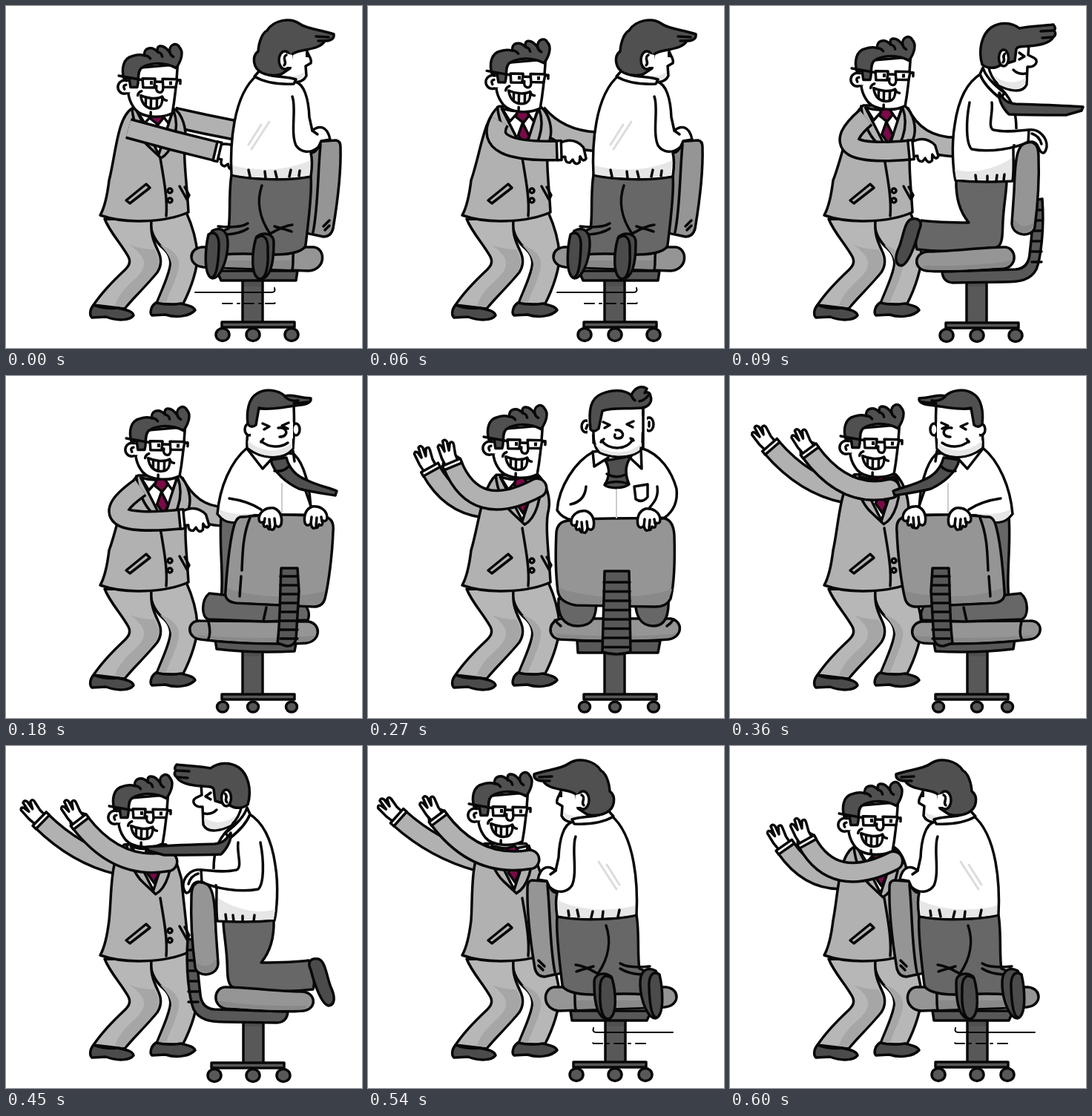
These frames come from a looping animation (480x461 px, 630 ms). An HTML page with a canvas:

```html
<!DOCTYPE html>
<html lang="en">
<head>
<meta charset="utf-8">
<title>Chair spin</title>
<style>
html, body { margin: 0; width: 100%; height: 100%; overflow: hidden; background: #fff; }
canvas { display: block; }
</style>
</head>
<body>
<canvas id="stage" width="480" height="461"></canvas>
<script>
const ctx = document.getElementById('stage').getContext('2d');
const INK = '#080808', SUIT = '#b1b1b1', LEGS = '#b7b7b7', LEGS_SHADE = '#a6a6a6', CHAIR = '#959595', CHAIR_SHADE = '#898989';
const DARK = '#585858', TROUSERS = '#676767', HAIR = '#505050', SHOE = '#4b4b4b', PALE = '#e6e6e6', WHITE = '#fff', WINE = '#7a0a48';
const LOOP = 630, STEP = 30, POSE = 90, AXIS = 333;

function flat(color, ...paths) {
  ctx.fillStyle = color;
  for (const d of paths) ctx.fill(new Path2D(d));
}
function line(...paths) {
  ctx.strokeStyle = INK;
  ctx.lineWidth = 3.5;
  for (const d of paths) ctx.stroke(new Path2D(d));
}
function shape(color, ...paths) {
  for (const d of paths) { flat(color, d); line(d); }
}
function thin(color, width, d) {
  ctx.strokeStyle = color;
  ctx.lineWidth = width;
  ctx.stroke(new Path2D(d));
}
function oval(color, x, y, rx, ry = rx) {
  shape(color, `M${x - rx},${y} a${rx},${ry} 0 1 0 ${2 * rx},0 a${rx},${ry} 0 1 0 ${-2 * rx},0Z`);
}
function moved(x, y, draw, angle = 0) {
  ctx.save();
  ctx.translate(x, y);
  ctx.rotate(angle);
  draw();
  ctx.restore();
}

// time, head shift, then shoulder, bend and wrist of the left and right arm
const keys = [
  [0, 0, 0, 165, 165, 225, 182, 284, 196, 226, 150, 270, 160, 312, 168],
  [90, 12, -10, 183, 150, 118, 206, 243, 194, 228, 142, 250, 190, 305, 190],
  [180, 10, -10, 181, 150, 102, 206, 236, 193, 226, 142, 250, 190, 295, 189],
  [270, 4, -12, 155, 178, 110, 172, 85, 127, 228, 151, 145, 195, 114, 120],
  [360, -3, -13, 155, 158, 100, 147, 56, 96, 216, 152, 155, 166, 108, 102],
  [450, -13, -13, 150, 160, 95, 147, 48, 101, 218, 156, 150, 168, 100, 103],
  [540, -16, -16, 150, 156, 90, 140, 42, 97, 218, 153, 145, 165, 95, 98],
  [600, -5, -3, 148, 180, 105, 180, 75, 137, 220, 155, 140, 195, 104, 130]
];
function bodyAt(t) {
  const i = keys.findLastIndex(k => k[0] <= t), from = keys[i], to = keys[i + 1] || from;
  const f = to === from ? 0 : (t - from[0]) / (to[0] - from[0]);
  return from.map((v, n) => v + (to[n] - v) * f).slice(1);
}

function arm([sx, sy, bx, by, wx, wy], back, cap) {
  const d = `M${sx},${sy} Q${bx},${by} ${wx},${wy}`;
  ctx.lineCap = cap;
  thin(INK, 29, d);
  thin(SUIT, 22, d);
  ctx.lineCap = 'round';
  moved(wx, wy, () => {
    shape(WHITE, back
      ? 'M2,-9 L14,-10 L30,-9 Q34,-6 29,-4 L21,-3 L35,0 Q37,4 32,5 L20,3 L29,8 Q30,13 25,12 L12,9 L2,9Z'
      : 'M2,-10 C16,-16 26,-13 34,-3 L37,12 Q33,18 29,9 L28,17 Q22,22 19,13 L15,17 Q8,17 9,9 L2,9Z');
    shape(WHITE, 'M-2,-13 H4 V13 H-2Z');
  }, Math.atan2(wy - by, wx - bx));
}

function legs() {
  shape(LEGS,
    'M195,288 C194,303 200,315 210,325 C221,334 223,343 221,352 C217,370 208,387 203,401 L238,403 C250,380 259,352 258,335 C257,315 252,298 243,278Z',
    'M133,287 C140,305 155,320 165,338 C169,346 165,351 160,356 C145,370 130,385 118,403 L160,408 C172,393 192,374 204,359 C211,348 209,338 205,330 C197,313 195,305 196,288Z');
  flat(LEGS_SHADE, 'M167,322 C189,338 192,350 176,366 C160,380 150,392 147,404 L158,406 C172,391 190,374 202,358 C208,348 206,338 200,328 C188,328 178,326 167,322Z',
    'M208,322 C222,326 236,337 233,352 C229,372 220,385 216,400 L205,400 C212,382 222,363 223,348 C222,338 216,331 208,322Z');
  shape(SHOE, 'M118,403 C112,410 113,418 116,420 L135,419 C150,425 167,424 172,417 C170,410 158,409 150,407 Q135,409 118,403Z',
    'M202,400 C194,406 194,415 197,417 L215,416 C230,421 248,418 255,410 C253,404 242,403 236,401 Q220,404 202,400Z');
}

function smilingHead() {
  shape(WHITE, 'M178,80 L233,74 C232,98 230,122 227,140 C212,148 187,147 177,136 C168,125 165,112 168,98Z');
  oval(WHITE, 162, 106, 9);
  flat(WHITE, 'M165,99 H174 V113 H165Z');
  line('M164,103 q-5,1 -2,6');
  shape(HAIR, 'M161,95 C157,82 159,67 172,64 Q180,61 188,63 C186,53 197,49 206,58 C202,48 213,46 222,58 C220,48 231,43 235,51 C241,57 238,69 231,79 C215,71 196,72 184,80 C178,86 182,96 179,106 L170,106 L168,94Z');
  line('M188,63 q5,0 8,4', 'M206,58 q5,1 6,6', 'M222,58 q1,4 5,6');
  line('M154,91 L186,96', 'M203,98 H213', 'M231,96 L237,95 V100');
  shape(WHITE, 'M186,94 H203 L202,106 H187Z', 'M213,94 H233 L231,105 H214Z');
  flat(INK, 'M196,97 h4 v5 h-4Z', 'M222,97 h4 v5 h-4Z');
  line('M205,104 C203,114 214,115 214,107');
  shape(WHITE, 'M184,117 C193,121 206,122 213,118 C214,127 211,133 205,134 C194,136 186,130 184,117Z');
  line('M191,121 V131', 'M198,122 V134', 'M206,121 V132', 'M180,117 q1,-5 5,-6', 'M213,118 q2,5 6,5', 'M198,139 V143');
}

function pusher(t) {
  const [hx, hy, ...joints] = bodyAt(t), left = joints.slice(0, 6), right = joints.slice(6);
  const thrown = t > 210, a = hx * .8, b = hy * .4;
  legs();
  thrown ? arm(left, true, 'butt') : arm(right, false, 'butt');
  shape(SUIT, `M${170 + a},${138 + b} C${150 + a},150 ${148 + a / 2},200 139,235 C136,260 131,275 127,282 C160,294 215,292 246,278 C244,240 238,200 ${242 + a / 2},180 C${243 + a},165 ${238 + a},145 ${226 + a},${138 + b}Z`);
  moved(a * .7, b, () => {
    shape(WHITE, 'M176,141 L206,200 L225,141 Q200,148 176,141Z');
    shape(WINE, 'M204,160 L213,178 L207,190 L198,177Z', 'M197,144 L207,141 L213,150 L205,160 L195,152Z');
    line('M170,139 C172,158 180,178 192,189 L209,205 C222,198 236,168 226,141', 'M177,142 L187,158 L196,148', 'M212,149 L219,158 L225,142');
  });
  line('M208,205 C213,235 218,260 216,283', 'M234,243 l10,18 3,-6 -6,-11');
  shape(SUIT, 'M162,262 L189,240 L194,245 L167,266Z');
  oval(SUIT, 221, 249, 3);
  oval(SUIT, 221, 262, 3);
  moved(hx, hy, smilingHead, .02);
  thrown ? arm(right, true, 'round') : arm(left, false, 'butt');
}

function base(wheelY, r) {
  shape(DARK, 'M319,365 H346 V430 H319Z');
  flat(HAIR, 'M321,366 H344 V378 H321Z');
  shape(DARK, `M291,${wheelY - 17} H389 V${wheelY - 10} H291Z`);
  for (const x of [292, 333, 385]) oval(DARK, x, wheelY, r, r - .5);
}
function ribs(x, width, top, bottom, gap) {
  for (let y = top; y <= bottom; y += gap) line(`M${x},${y} h${width}`);
}
function gripHand(x, y, flip = 1) {
  moved(x, y, () => {
    ctx.scale(flip, 1);
    shape(WHITE, 'M-14,6 C-13,-4 -4,-9 6,-8 C15,-5 18,5 16,14 Q13,20 8,15 Q6,24 1,20 Q-1,22 -3,16 Q-8,20 -8,11 Q-14,13 -14,6Z');
    line('M8,15 L7,6', 'M1,18 L0,7', 'M-7,12 L-6,6');
  });
}

function backPose() {
  base(443, 9);
  shape(DARK, 'M284,357 H393 L391,370 H290Z');
  shape(CHAIR, 'M416,183 L445,181 Q451,182 451,190 C452,225 446,270 441,300 Q438,311 428,311 L405,306 L411,215Z');
  flat(CHAIR_SHADE, 'M412,200 L423,186 C421,230 420,270 414,306 L407,305Z');
  line('M424,187 C420,230 421,270 414,305', 'M428,297 L436,289', 'M430,302 L436,296');
  shape(CHAIR, 'M264,325 C245,327 245,350 266,352 L408,357 C432,355 431,327 415,325Z');
  flat(CHAIR_SHADE, 'M268,343 H385 V355 L270,351Z');
  line('M388,328 C386,338 388,348 386,355');
  shape(TROUSERS, 'M304,228 C300,250 303,285 300,300 L288,305 L292,335 C330,332 350,336 365,335 C385,335 403,330 404,322 C408,290 413,250 411,230Z');
  line('M345,242 C338,262 341,285 356,307 C365,302 375,296 386,295', 'M362,297 C372,300 380,302 385,304', 'M286,297 C305,299 318,298 326,293', 'M298,308 C310,307 320,304 326,300');
  shape(SHOE, 'M278,303 C292,296 300,305 299,323 C298,345 288,368 278,367 C268,362 268,322 278,303Z', 'M273,308 C282,302 288,310 287,326 C286,352 283,367 276,366 C266,358 269,325 273,308Z',
    'M338,311 C347,304 362,306 361,320 C361,345 357,366 344,368 C330,366 332,330 338,311Z', 'M337,313 C347,306 354,312 353,330 C354,350 351,368 342,368 C329,364 332,330 337,313Z');
  shape(WHITE, 'M339,93 L390,102 C402,105 408,125 409,150 L413,168 C421,161 433,160 437,180 L425,182 C420,195 415,198 411,198 C414,210 412,222 411,230 C380,236 330,234 304,228 C302,190 305,120 339,93Z');
  flat(PALE, 'M306,215 C340,224 380,222 410,208 L409,228 C380,234 330,232 306,227Z');
  thin('#dcdcdc', 3, 'M355,156 L331,193 M344,160 L327,187');
  line('M386,122 C392,137 383,170 391,188 C398,198 410,199 420,191', 'M413,168 L420,173', 'M327,221 l2,9', 'M349,223 l1,9', 'M363,223 l2,8', 'M384,221 l-2,9', 'M396,222 l-1,7');
  shape(WHITE, 'M382,62 L405,57 C406,67 413,69 411,77 L404,81 L405,94 C400,105 386,104 378,99 L360,92 L366,70Z');
  flat(PALE, 'M372,94 C385,96 398,94 403,88 C403,101 388,103 378,98Z');
  shape(WHITE, 'M342,87 C355,97 375,94 391,99 L388,105 C368,106 350,104 335,95Z');
  shape(HAIR, 'M345,90 C333,84 331,68 340,61 C341,47 346,36 352,33 C360,20 382,14 396,24 C405,31 425,32 442,38 C443,44 438,47 430,47 C425,55 415,57 405,59 C395,61 388,62 385,66 L383,84 L371,92 Q358,96 345,90Z');
  oval(WHITE, 376, 73, 8, 12);
  flat(WHITE, 'M378,64 L386,66 V82 H378Z');
  line('M378,66 C371,70 380,76 375,80', 'M418,41 L435,42', 'M421,47 L430,47');
  flat(INK, 'M404,62 h4 v7 h-4Z');
  thin(INK, 2, 'M255,386 H358 Q364,386 362,380');
  ctx.setLineDash([13, 7, 3, 6]);
  thin(INK, 2, 'M292,401 H362 L367,396');
  ctx.setLineDash([]);
}

function sidePose() {
  base(444, 9);
  shape(DARK, 'M286,358 L385,355 C398,354 403,345 404,335 C407,310 409,290 409,262 L421,260 C424,300 419,340 413,355 C405,370 390,372 370,372 L300,373 Q287,372 286,358Z');
  ribs(407, 13, 275, 346, 14);
  shape(TROUSERS, 'M305,234 C304,262 312,280 322,292 C295,292 272,291 258,289 C251,300 249,320 252,328 C290,333 330,330 358,326 C369,323 367,305 368,290 C369,268 373,250 373,235Z');
  shape(SHOE, 'M245,287 C256,285 260,292 255,302 C250,322 240,349 231,350 C222,349 222,338 228,325 C234,310 235,290 245,287Z');
  shape(CHAIR, 'M270,331 C247,330 246,355 265,357 C300,360 350,355 370,354 C389,350 386,325 370,325 C340,325 300,331 270,331Z');
  flat(CHAIR_SHADE, 'M260,350 C300,351 350,349 379,343 Q376,352 369,352 C340,354 290,358 263,355Z');
  shape(WHITE, 'M339,91 C320,102 308,125 303,160 C298,190 301,222 304,235 C330,238 360,237 381,236 C383,220 382,205 382,193 L386,166 C386,145 382,128 366,112Z');
  flat(PALE, 'M303,220 C330,228 360,218 380,205 L379,234 H305Z');
  shape(CHAIR, 'M396,186 C385,191 384,220 383,250 L380,293 C381,312 409,312 411,298 C416,260 417,230 416,202 C416,183 406,181 396,186Z');
  flat(CHAIR_SHADE, 'M382,285 C390,300 403,299 410,290 C410,308 383,311 382,293Z');
  flat(WHITE, 'M324,150 L354,164 L403,167 L402,184 L326,193Z');
  line('M323,130 C318,155 318,186 326,193 C350,198 385,192 402,183', 'M353,130 C355,145 347,163 355,167 C372,171 388,168 403,167');
  shape(WHITE, 'M403,167 C417,165 428,178 427,190 Q424,203 418,195 L414,187 Q409,181 402,184Z');
  line('M407,172 q10,3 13,14', 'M331,228 l1,8', 'M347,229 v7', 'M360,228 l-1,8', 'M370,227 l-1,8');
  shape(WHITE, 'M372,56 L403,52 L402,66 L410,70 C417,74 412,83 401,82 L400,106 C394,119 374,114 362,106 C354,99 350,90 348,80Z');
  flat(PALE, 'M355,92 C370,107 390,104 399,96 C400,116 378,114 363,106Z');
  shape(WHITE, 'M341,83 C345,97 358,108 370,117 L365,125 C352,115 342,105 337,92Z');
  shape(HAIR, 'M340,79 C334,58 340,38 352,29 C364,21 380,22 390,30 C405,27 420,27 436,25 Q440,30 437,33 Q441,38 436,42 C431,51 415,53 403,54 C393,55 388,54 386,58 L384,74 L364,80 C357,85 346,84 340,79Z');
  line('M419,34 L437,33', 'M421,43 L435,42');
  oval(WHITE, 369, 70, 6.5, 11);
  line('M371,64 C365,69 373,72 368,76', 'M390,63 L397,68 L390,72', 'M382,86 Q389,93 399,91');
  shape(HAIR, 'M363,117 C370,128 375,131 385,132 C410,133 450,134 476,136 L474,141 L453,147 C420,147 395,147 376,146 C366,136 362,125 363,117Z');
}

function squint(x, y, gap) {
  line(`M${x},${y} l9,4 -7,4`, `M${x + gap},${y - 1} l-9,4 8,4`);
}

function quarterPose() {
  base(446, 7.5);
  shape(DARK, 'M282,355 H392 L389,371 Q335,374 284,368Z');
  shape(TROUSERS, 'M290,190 C287,230 294,270 290,300 L340,310 V190Z');
  shape(CHAIR, 'M262,330 C243,329 243,353 262,355 C310,361 370,362 405,360 C425,357 425,334 408,331Z');
  flat(CHAIR_SHADE, 'M258,349 C310,354 370,354 416,350 Q413,358 404,358 C360,360 300,358 262,353Z');
  line('M273,331 C275,340 276,348 273,354');
  shape(TROUSERS, 'M274,293 C263,302 263,325 273,328 L350,331 L407,329 C411,318 405,310 400,306Z');
  line('M351,312 L347,330');
  shape(WHITE, 'M325,97 C303,115 288,150 285,186 Q295,199 308,197 L320,188 L411,187 C411,150 402,118 388,105Z');
  flat(PALE, 'M288,180 Q310,190 343,184 L318,190 L308,196 Q293,196 288,185Z');
  shape(CHAIR, 'M320,190 C350,186 400,186 430,190 Q443,192 441,210 C440,240 435,280 430,300 Q427,311 415,311 L310,306 Q294,304 296,290 C298,260 302,220 308,200 Q312,188 320,190Z');
  flat(CHAIR_SHADE, 'M298,285 C330,300 390,300 430,290 Q427,309 415,309 L310,304 Q297,302 298,285Z');
  line('M329,191 C319,215 319,240 318,262', 'M317,270 L315,297');
  shape(DARK, 'M371,259 H393 L395,290 L391,355 Q388,365 378,364 L366,360 C370,330 369,300 371,259Z');
  ribs(370, 23, 270, 355, 12);
  line('M301,165 C315,167 332,172 344,180', 'M404,155 L412,178');
  thin('#ccc', 2, 'M372,145 V184');
  gripHand(355, 186);
  gripHand(419, 184, -1);
  shape(WHITE, 'M330,45 L388,40 C389,60 388,85 387,98 C375,114 345,113 325,97 C324,80 328,60 330,45Z');
  flat(PALE, 'M326,87 C345,104 370,104 386,90 L386,97 C372,112 345,111 327,96Z');
  oval(WHITE, 328, 72, 6, 8);
  oval(WHITE, 391, 72, 5, 8);
  flat(WHITE, 'M330,62 H340 V84 H330Z', 'M379,62 H387 V84 H379Z');
  shape(HAIR, 'M326,65 C324,48 327,30 338,24 C350,16 367,19 376,27 C386,24 392,29 411,30 C412,37 403,39 390,40 C370,43 350,46 341,43 L337,66 Q331,71 326,65Z');
  line('M376,28 q8,7 18,5', 'M388,37 L408,35');
  squint(346, 64, 35);
  line('M367,70 C380,68 382,82 369,82', 'M344,88 C355,97 370,97 380,90', 'M344,89 l3,-4');
  line('M325,98 L346,125 L358,112', 'M387,101 L389,115');
  shape(HAIR, 'M357,113 L378,110 C382,125 392,135 405,140 C420,148 435,150 446,155 L444,161 C425,158 410,156 395,152 C380,145 360,130 357,113Z');
  line('M362,128 q12,2 20,-7');
}

function frontPose() {
  base(446, 7.5);
  shape(DARK, 'M282,357 H394 L391,373 H283Z');
  shape(CHAIR, 'M262,327 C243,328 240,352 258,355 C310,358 370,358 405,355 C425,352 425,330 408,327Z');
  flat(CHAIR_SHADE, 'M252,347 C310,352 370,352 415,347 Q412,353 404,353 C360,356 300,356 258,353Z');
  shape(TROUSERS, 'M257,300 C255,325 265,337 283,337 C303,337 308,325 308,302Z', 'M360,302 C361,325 368,337 385,337 C402,337 406,320 405,300Z');
  line('M252,329 q4,5 8,8', 'M412,328 q-4,6 -9,9');
  shape(WHITE, 'M304,102 C279,115 257,150 255,181 Q262,192 275,194 L400,191 C412,182 418,170 416,152 C410,130 395,105 368,97Z');
  shape(CHAIR, 'M270,195 C310,190 370,192 400,192 Q412,195 413,215 C414,250 413,280 408,300 Q402,312 385,311 L280,309 Q258,305 256,290 C252,260 253,230 254,210 Q256,196 270,195Z');
  flat(CHAIR_SHADE, 'M257,285 C290,300 370,303 410,287 Q405,310 385,309 L280,307 Q259,303 257,285Z');
  shape(DARK, 'M319,263 H352 L354,372 Q335,378 316,372Z');
  ribs(318, 35, 278, 366, 12.5);
  line('M294,149 C293,162 287,170 273,173', 'M390,149 C392,163 386,170 380,177');
  thin('#ccc', 2, 'M335,152 V191');
  gripHand(288, 190);
  gripHand(380, 187, -1);
  shape(WHITE, 'M359,149 L377,146 V163 Q370,172 361,166Z');
  shape(WHITE, 'M304,45 C302,75 303,95 312,103 C330,112 360,111 370,97 L371,40Z');
  flat(PALE, 'M306,92 C325,108 355,105 369,90 V97 C358,110 330,110 313,102Z');
  oval(WHITE, 294, 68, 6, 8);
  oval(WHITE, 379, 65, 6, 9);
  flat(WHITE, 'M296,58 H312 V79 H296Z', 'M362,54 H376 V76 H362Z');
  line('M371,42 V97', 'M304,70 V90', 'M296,66 l-2,5', 'M379,62 v6');
  shape(HAIR, 'M300,72 C297,45 300,30 315,24 C330,18 346,18 355,26 C359,16 368,12 376,17 L373,23 Q380,20 381,27 C384,36 377,42 369,43 C350,45 330,42 316,47 L311,71 Q304,77 300,72Z');
  line('M355,26 q2,5 5,7', 'M366,34 q7,-1 12,-8');
  squint(317, 62, 41);
  line('M334,73 C344,71 348,84 337,84 Q331,84 333,79', 'M315,87 C325,101 350,100 357,85', 'M314,89 l4,-4', 'M354,84 l4,3');
  line('M303,102 L305,122 L324,110', 'M368,97 L369,125 L353,110');
  shape(HAIR, 'M320,114 L355,108 C346,120 346,132 352,146 C345,152 325,152 319,147 C326,136 326,124 320,114Z');
  line('M322,132 q12,7 25,1', 'M320,145 q15,-5 31,0');
}

const poses = [backPose, sidePose, quarterPose, frontPose];
function sitter(t) {
  const turn = Math.floor(t / POSE);
  ctx.save();
  if (turn > 3) ctx.transform(-1, 0, 0, 1, 2 * AXIS, 0);
  poses[turn > 3 ? 6 - turn : turn]();
  ctx.restore();
}

function render(now) {
  const t = Math.floor(now % LOOP / STEP) * STEP;
  ctx.fillStyle = WHITE;
  ctx.fillRect(0, 0, 480, 461);
  ctx.lineJoin = ctx.lineCap = 'round';
  pusher(t);
  sitter(t);
}
const start = performance.now();
function tick() {
  render(performance.now() - start);
  requestAnimationFrame(tick);
}
tick();
</script>
</body>
</html>
```
